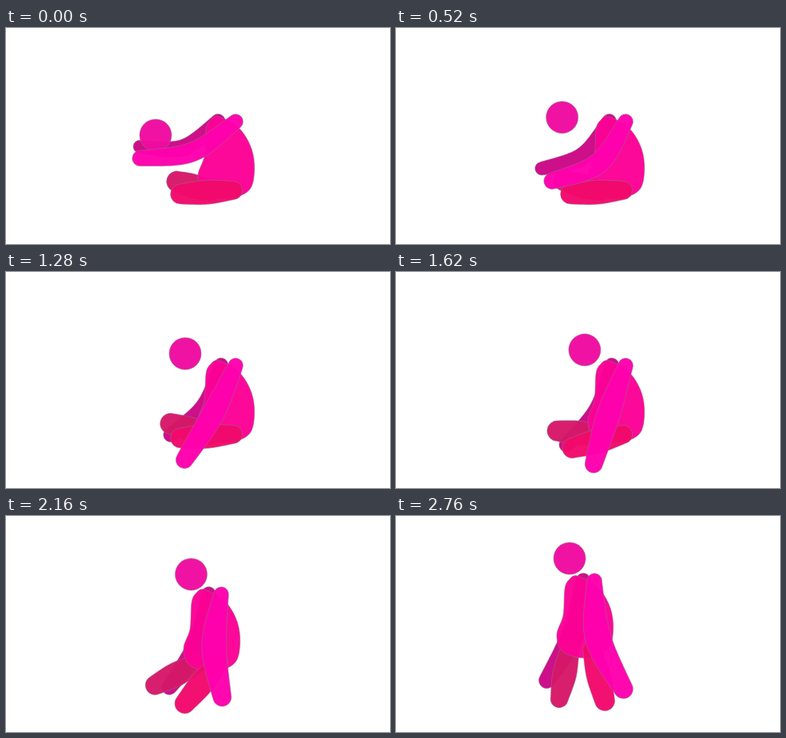
Write an HTML page with a canvas that moves like this. It is 480 by 270 pixels and loops after 2.78 s.

```html
<!DOCTYPE html>
<html lang="en">
<head>
<meta charset="utf-8">
<title>Standing up</title>
<style>
  html, body { margin: 0; width: 100%; height: 100%; overflow: hidden; background: #fff; }
  canvas { display: block; width: 480px; height: 270px; }
</style>
</head>
<body>
<canvas id="stage" width="480" height="270"></canvas>
<script>
const ctx = document.getElementById('stage').getContext('2d');
const LOOP = 2780, STEP = 20, LAST = LOOP - STEP, RISE = 1280;

// Head position relative to the body: time, x, y.
const headKeys = [
  [0, 187, 134], [260, 199, 115], [800, 217, 108], [RISE, 224, 102], [1940, 247, 93], [LAST, 256, 89]
];
// Front arm: time, angle in degrees, reach, elbow bend.
const armKeys = [
  [0, 159, 128, 16], [800, 131.5, 113, 21], [RISE, 118.5, 134, 4],
  [1940, 98, 125, -7], [2380, 81, 132, -12], [LAST, 75, 140, -14]
];
const torso = [
  [266, 111], [290, 124], [305, 146], [310.5, 171], [307, 198], [292, 210], [268, 213],
  [246, 204], [240, 184], [248, 160], [250, 127], [256, 115]
];

const clamp = v => Math.max(0, Math.min(1, v));
const mix = (a, b, u) => a + (b - a) * u;
const part = (from, to, t) => clamp((t - from) / (to - from));
const smooth = u => u * u * (3 - 2 * u);

function at(keys, t) {
  const i = Math.max(1, keys.findIndex(k => k[0] >= t));
  const [a, b] = [keys[i - 1], keys[i]];
  return a.map((v, n) => mix(v, b[n], part(a[0], b[0], t))).slice(1);
}

function paint(color, alpha) {
  ctx.globalAlpha = alpha;
  ctx.fillStyle = color;
  ctx.fill();
  ctx.globalAlpha = 0.6;
  ctx.strokeStyle = '#94708a';
  ctx.lineWidth = 0.9;
  ctx.stroke();
  ctx.globalAlpha = 1;
}

// A limb hangs from (x, y); radii are those of its root, joint and end.
function limb({ x, y, angle, reach, bend = 0, radii, color, alpha = 0.97 }) {
  const N = 36, left = [], right = [];
  const turn = angle * Math.PI / 180, cos = Math.cos(turn), sin = Math.sin(turn);
  const ex = x + reach * cos, ey = y + reach * sin;
  const jx = (x + ex) / 2 + sin * bend / 0.75, jy = (y + ey) / 2 - cos * bend / 0.75;
  // Cubic curve with both handles on the joint.
  const curve = (a, j, b, u) => a * (1 - u) ** 3 + 3 * j * u * (1 - u) + b * u ** 3;
  const slope = (a, j, b, u) => (j - a) * (1 - u) ** 2 + (b - j) * u ** 2;
  const heading = u => Math.atan2(slope(y, jy, ey, u), slope(x, jx, ex, u));
  for (let i = 0; i <= N; i++) {
    const u = i / N, g = heading(u), r = curve(...radii, u);
    const cx = curve(x, jx, ex, u), cy = curve(y, jy, ey, u);
    left.push([cx + r * Math.sin(g), cy - r * Math.cos(g)]);
    right.unshift([cx - r * Math.sin(g), cy + r * Math.cos(g)]);
  }
  const q = Math.PI / 2, start = heading(0), end = heading(1);
  ctx.beginPath();
  left.forEach(p => ctx.lineTo(...p));
  ctx.arc(ex, ey, radii[2], end - q, end + q);
  right.forEach(p => ctx.lineTo(...p));
  ctx.arc(x, y, radii[0], start + q, start + 3 * q);
  ctx.closePath();
  paint(color, alpha);
}

// Smooth closed outline through the points.
function blob(points, dx, dy) {
  const n = points.length, p = i => points[(i + n) % n];
  ctx.beginPath();
  ctx.moveTo(p(0)[0] + dx, p(0)[1] + dy);
  for (let i = 0; i < n; i++) {
    const [a, b, c, d] = [p(i - 1), p(i), p(i + 1), p(i + 2)];
    ctx.bezierCurveTo(
      b[0] + (c[0] - a[0]) / 6 + dx, b[1] + (c[1] - a[1]) / 6 + dy,
      c[0] - (d[0] - b[0]) / 6 + dx, c[1] - (d[1] - b[1]) / 6 + dy,
      c[0] + dx, c[1] + dy);
  }
  ctx.closePath();
}

function draw(t) {
  const p = t / LAST;
  const swing = part(RISE, LAST, t) ** 1.5;
  const dx = -39 * smooth(part(1620, LAST, t));
  const dy = -36 * smooth(part(1620, 2660, t));

  ctx.fillStyle = '#fff';
  ctx.fillRect(0, 0, 480, 270);

  limb({
    x: mix(265, 273, p) + dx, y: 116.5 + dy,
    angle: 110 + 52 * (1 - p) ** 1.9,
    reach: mix(103, 133, smooth(part(800, LAST, t))),
    bend: mix(18, 11, p),
    radii: [9, mix(11, 16, p), mix(8, 10, p)], color: '#cc0886'
  });
  limb({
    x: 256 + dx, y: 204 + dy,
    angle: mix(196, 102, swing), reach: mix(44, 62, p),
    radii: [12, 16, mix(13, 11, swing)], color: '#d6186a'
  });
  blob(torso, dx, dy);
  paint('#fc0296', 0.97);

  const [hx, hy] = at(headKeys, t);
  ctx.beginPath();
  ctx.arc(hx + dx, hy + dy, 20, 0, 2 * Math.PI);
  paint('#f00ca0', 0.97);

  limb({
    x: 284 + dx, y: 203 + dy,
    angle: mix(176, 76, swing), reach: 66,
    radii: [11.5, 16, 12.5], color: '#f20a6c'
  });
  const [angle, reach, bend] = at(armKeys, t);
  limb({
    x: 287 + dx, y: 117 + dy, angle, reach, bend,
    radii: [9.3, mix(13, 18, p), mix(9.7, 12, p)], color: '#ff00ae'
  });
}

function tick() {
  const t = performance.now() % LOOP;
  draw(t - t % STEP);
  requestAnimationFrame(tick);
}
tick();
</script>
</body>
</html>
```
